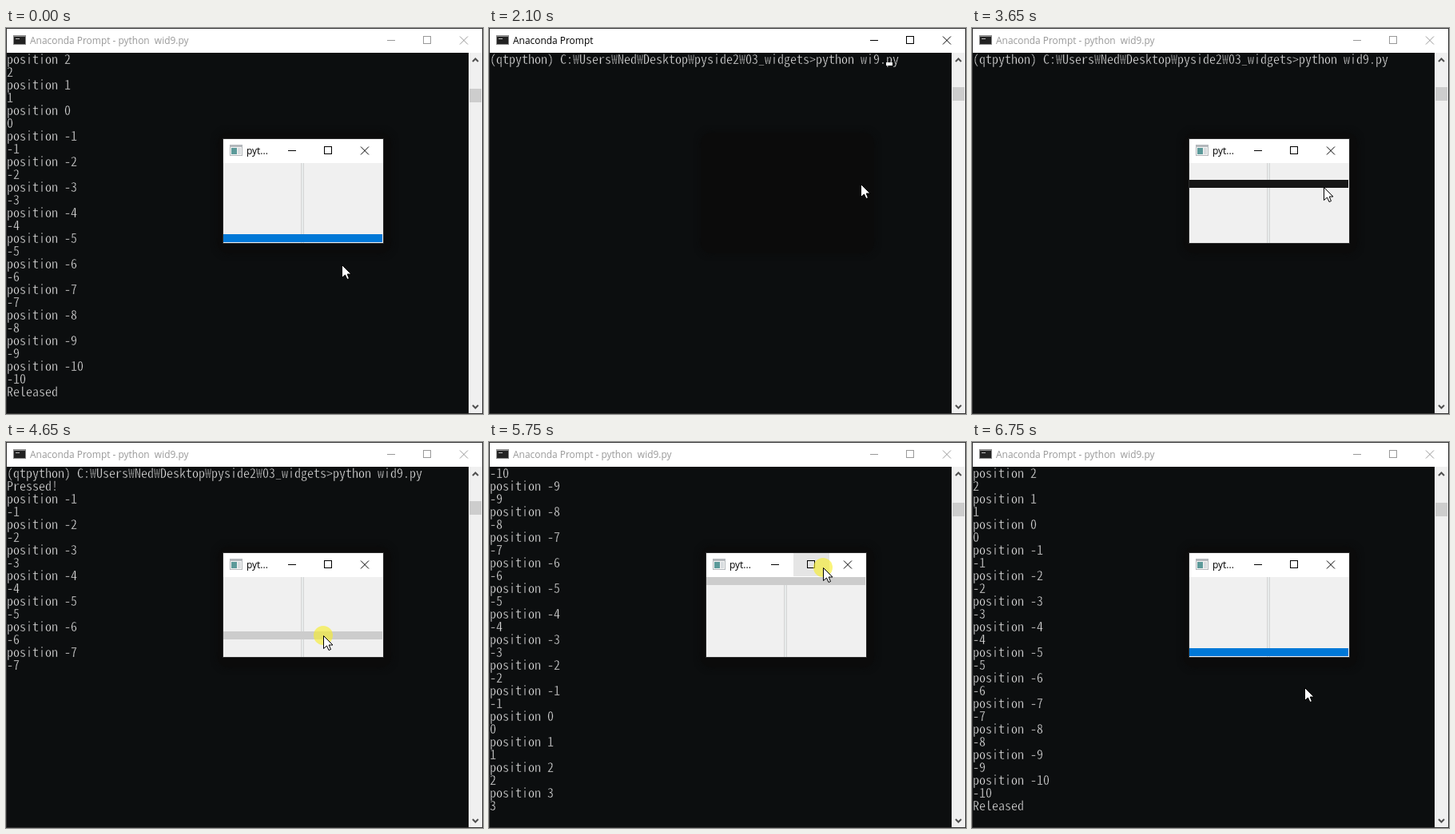
These frames come from a looping animation (597x483 px, 6800 ms). An HTML page with a canvas:

```html
<!DOCTYPE html>
<html lang="en">
<head>
<meta charset="utf-8">
<title>Terminal and slider</title>
<style>
html, body { margin: 0; width: 100%; height: 100%; overflow: hidden; background: #0c0e0f; }
canvas { display: block; }
</style>
</head>
<body>
<canvas id="stage" width="597" height="483"></canvas>
<script>
const W = 597, H = 483, LOOP = 6800, TICK = 50, CELL = 8, ROW = 16, ROWS = 28;
const BACK = '#0c0e0f';
const stage = document.getElementById('stage').getContext('2d');
let g = stage;

const MONO = '"Noto Sans Mono CJK KR", "Noto Sans Mono CJK JP", "Noto Sans Mono", "Liberation Mono", monospace';
const UI = '11.95px "Open Sans", "Noto Sans", sans-serif';
const PROMPT = '(qtpython) C:₩Users₩Ned₩Desktop₩pyside2₩03_widgets>python ';
g.font = `300 100px ${MONO}`;
const TERM = `300 ${100 * CELL / g.measureText('0').width}px ${MONO}`;

// [time, typed text, caret column, caret visible]
const KEYS = [
  [0, '', 0, 1], [550, '', 0, 0], [750, 'w', 1, 1], [900, 'wi', 2, 1],
  [1050, 'wi9', 3, 1], [1250, 'wi9.', 4, 1], [1400, 'wi9.p', 5, 1],
  [1500, 'wi9.py', 6, 1], [1600, 'wi9.py', 6, 0], [2000, 'wi9.py', 5, 1],
  [2100, 'wi9.py', 4, 1], [2200, 'wi9.py', 3, 1], [2250, 'wi9.py', 2, 1],
  [2350, 'wid9.py', 3, 1]
];
const ENTER = 2550, OPEN = 2800, HOVER = 3650, PRESS = 4250, RELEASE = 6500, LEAVE = 6550;

// [time, x, y] of the pointer tip
const PATH = [
  [0, 465, 195], [3600, 465, 195], [3650, 440, 199], [3700, 434, 199],
  [3900, 434, 199], [4100, 398, 196], [4300, 398, 196], [4650, 397, 242],
  [4850, 400, 266], [4900, 400, 266], [5550, 417, 159], [5700, 417, 159],
  [5750, 418, 157], [6400, 404, 264], [6500, 404, 266], [6750, 416, 307],
  [6800, 420, 296]
];

// Slider values over time: down, up, down again
const MOVES = [];
const sweep = (start, from, to) => {
  const n = Math.abs(to - from), dir = Math.sign(to - from);
  for (let i = 0; i <= n; i++) MOVES.push([start + i * TICK, from + i * dir]);
};
sweep(4350, -1, -10);
sweep(4950, -9, 3);
sweep(5800, 2, -10);

const latest = (list, t) => list.filter(e => e[0] <= t).pop();

function pointer(t) {
  const i = Math.max(1, PATH.findIndex(k => k[0] >= t));
  const [t0, x0, y0] = PATH[i - 1], [t1, x1, y1] = PATH[i];
  const p = (t - t0) / (t1 - t0);
  return [Math.round(x0 + (x1 - x0) * p), Math.round(y0 + (y1 - y0) * p)];
}

function rect(x, y, w, h, color) {
  g.fillStyle = color;
  g.fillRect(x, y, w, h);
}

function label(text, x, y, color) {
  g.font = UI;
  g.fillStyle = color;
  g.fillText(text, x, y);
}

function line(points, color, width = 1) {
  g.strokeStyle = color;
  g.lineWidth = width;
  g.beginPath();
  points.forEach(([x, y]) => g.lineTo(x, y));
  g.stroke();
}

// Draws a part on its own layer, then blends it in
function blend(alpha, draw) {
  const below = g, layer = document.createElement('canvas');
  layer.width = W;
  layer.height = H;
  g = layer.getContext('2d');
  draw();
  g = below;
  g.globalAlpha = alpha;
  g.drawImage(layer, 0, 0);
  g.globalAlpha = 1;
}

function buttons(x, y, color) {
  rect(x - 5, y, 10, 1, color);
  g.strokeStyle = color;
  g.lineWidth = 1;
  g.strokeRect(x + 40.5, y - 4.5, 9, 9);
  line([[x + 86, y - 4.5], [x + 96, y + 5.5]], color);
  line([[x + 86, y + 5.5], [x + 96, y - 4.5]], color);
}

// The thin stroke in the background colour slims the letters
function termText(text, row) {
  g.font = TERM;
  g.fillStyle = '#dcdcdc';
  g.strokeStyle = BACK;
  g.lineWidth = 0.35;
  [...text].forEach((c, i) => {
    g.fillText(c, 1 + i * CELL, 45 + row * ROW);
    g.strokeText(c, 1 + i * CELL, 45 + row * ROW);
  });
}

function terminal(t) {
  const active = t < 2850, ink = active ? '#000' : '#999';
  const [, typed, col, shown] = latest(KEYS, t);

  const log = [PROMPT + typed];
  if (t >= PRESS) log.push('Pressed!');
  MOVES.filter(m => m[0] <= t).forEach(([, v]) => log.push('position ' + v, String(v)));
  if (t >= RELEASE) log.push('Released');
  const scroll = Math.max(0, log.length + 1 - ROWS);

  rect(0, 0, W, H, BACK);
  g.save();
  g.shadowColor = g.fillStyle = '#0b0b0b';
  g.shadowBlur = 8;
  g.beginPath();
  g.roundRect(265, 131, 217, 151, 14);
  g.fill();
  g.restore();

  log.slice(scroll).forEach(termText);
  if (t >= ENTER && active) rect(1, 59, CELL, 4, '#f2f2f2');
  else if (active && shown) rect(1 + (PROMPT.length + col) * CELL, 43, CELL, 4, '#f2f2f2');

  rect(1, 1, W - 2, 30, '#fff');
  rect(9, 9, 16, 12, '#8a8a8a');
  rect(10, 11, 14, 9, '#222');
  rect(12, 13, 5, 1, '#bbb');
  label('Anaconda Prompt' + (t >= 2600 ? ' - python  wid9.py' : ''), 30, 20, ink);
  buttons(482, 15, ink);

  rect(579, 31, 17, 451, '#f0f0f0');
  rect(580, 74 + Math.min(2, Math.ceil(scroll / 10)), 15, 17, '#cdcdcd');
  line([[584, 42], [587.5, 38.5], [591, 42]], '#505050', 2);
  line([[584, 472], [587.5, 475.5], [591, 472]], '#505050', 2);
  g.strokeStyle = '#333';
  g.lineWidth = 1;
  g.strokeRect(0.5, 0.5, W - 1, H - 1);
}

function sliderWindow(t) {
  const [px, py] = pointer(t);
  const value = (latest(MOVES, t) || [0, 0])[1];
  const held = t >= PRESS && t < RELEASE;
  const hover = t >= HOVER && t < LEAVE;

  rect(271, 138, 202, 132, '#2b2b2b');
  rect(272, 139, 200, 30, '#fff');
  if (px >= 381 && px < 426 && py >= 139 && py < 169) rect(381, 139, 45, 29, '#e5e5e5');
  rect(280, 146, 16, 14, '#b4b8bc');
  rect(281, 149, 14, 10, '#f5f5f5');
  rect(282, 150, 7, 8, '#5c9a9a');
  rect(290, 150, 4, 8, '#d8dcdf');
  label('pyt...', 301, 158, '#000');
  buttons(358, 153, '#000');

  rect(272, 169, 200, 100, '#f0f0f0');
  rect(369, 169, 4, 100, '#d6d6d6');
  rect(370, 169, 2, 100, '#e7eaea');
  const y = Math.round(169 + (3 - value) * 89 / 13);
  rect(272, y, 199, 10, held ? '#ccc' : hover ? '#171717' : '#0078d7');
}

function mouse(t) {
  const [x, y] = pointer(t);
  if (t >= 2850 && t < HOVER) {
    g.strokeStyle = '#2c96ee';
    g.lineWidth = 4.5;
    g.beginPath();
    g.arc(465, 194, 7.7, 0, 7);
    g.stroke();
    return;
  }
  if (t >= PRESS && t < RELEASE) {
    g.fillStyle = 'rgba(247, 238, 40, 0.62)';
    g.beginPath();
    g.arc(x, y, 12, 0, 7);
    g.fill();
  }
  g.save();
  g.translate(x + 0.5, y + 0.5);
  g.beginPath();
  [[0, 0], [0, 16], [4, 12.5], [6.5, 18], [9, 17], [6.7, 11.5], [11.5, 11.5]]
    .forEach(([a, b]) => g.lineTo(a, b));
  g.closePath();
  g.fillStyle = '#fff';
  g.fill();
  g.strokeStyle = '#000';
  g.lineWidth = 1;
  g.stroke();
  g.restore();
}

function scene(t) {
  terminal(t);
  if (t >= 3000) sliderWindow(t);
  else if (t > OPEN) {
    const shown = 1 - (1 - (t - OPEN) / 200) ** 1.3, scale = 0.95 + 0.05 * shown;
    blend(shown, () => {
      g.translate(371.5, 204);
      g.scale(scale, scale);
      g.translate(-372, -204);
      sliderWindow(t);
    });
  }
  mouse(t);
}

function frame() {
  const t = Math.floor(performance.now() % LOOP / TICK) * TICK;
  if (t < 400) {
    scene(LOOP);
    blend(t / 400, () => scene(t));
  } else scene(t);
  requestAnimationFrame(frame);
}
frame();
</script>
</body>
</html>
```
